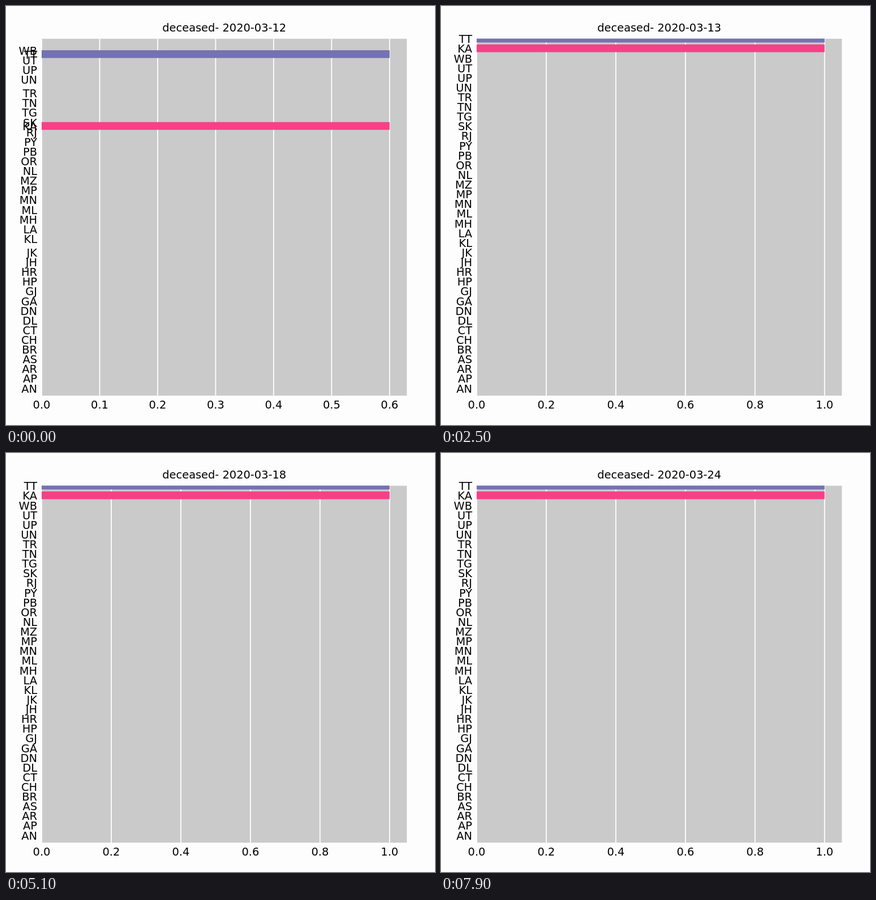
Write an HTML page with a canvas that moves like this. It is 758 by 739 pixels and loops after 8000 ms.

```html
<!DOCTYPE html>
<html lang="en">
<head>
<meta charset="utf-8">
<style>
  html, body { margin: 0; width: 100%; height: 100%; overflow: hidden; }
  canvas { display: block; }
</style>
</head>
<body>
<canvas id="stage" width="758" height="739"></canvas>
<script>
const ctx = document.getElementById('stage').getContext('2d');
const LOOP = 8000;
const LEFT = 63, RIGHT = 708.5, TOP = 57.5, BOTTOM = 687.5;
const ROW = (BOTTOM - TOP) / 36.8;
const BAR_WIDTH = (RIGHT - LEFT) / 1.05;
const CODES = ('AN AP AR AS BR CH CT DL DN GA GJ HP HR JH JK KL LA MH ML MN MP MZ ' +
  'NL OR PB PY RJ SK TG TN TR UN UP UT WB KA TT').split(' ');
const COLORS = { KA: '#f74187', TT: '#7572b2' };
// Times at which the date moves on by one day
const DAY_TIMES = [400, 2600, 3500, 3700, 4300, 4800, 5300, 5800, 6300, 6800, 7300, 7800];

const rowY = rank => BOTTOM - (rank - 0.2) * ROW;

// KA and TT climb to the top; every row they pass slides down one place.
function rankOf(index, value) {
  const rank = index + 1, left = 1 - value;
  const shift = rank === 37 ? -4 : rank === 36 ? -20 : rank >= 32 ? 2 : rank >= 16 ? 1 : 0;
  return rank + shift * left;
}

function text(str, x, y, align) {
  ctx.textAlign = align;
  ctx.fillText(str, x, y);
}

function draw(t) {
  const value = t < 100 ? 0.6 : t < 400 ? 0.8 : 1;
  const day = 12 + DAY_TIMES.filter(time => t >= time).length;
  const bright = t >= 400 && t < 2500;

  ctx.fillStyle = bright ? '#fff' : '#fdfdfd';
  ctx.fillRect(0, 0, 758, 739);

  ctx.save();
  ctx.beginPath();
  ctx.rect(LEFT, TOP, RIGHT - LEFT, BOTTOM - TOP);
  ctx.clip();
  ctx.fillStyle = bright ? '#ccc' : '#cacaca';
  ctx.fillRect(LEFT, TOP, RIGHT - LEFT, BOTTOM - TOP);

  const step = value < 1 ? 0.1 : 0.2;
  const ticks = Array.from({ length: Math.round(value / step) + 1 }, (_, i) => i * step);
  const tickX = tick => LEFT + tick / value * BAR_WIDTH;
  ctx.fillStyle = '#fff';
  for (const tick of ticks) ctx.fillRect(tickX(tick) - 0.9, TOP, 1.8, BOTTOM - TOP);

  CODES.forEach((code, i) => {
    if (!COLORS[code]) return;
    ctx.fillStyle = COLORS[code];
    ctx.fillRect(LEFT, rowY(rankOf(i, value)) - ROW * 0.4, BAR_WIDTH, ROW * 0.8);
  });
  ctx.restore();

  ctx.fillStyle = '#000';
  ctx.font = '19.4px "DejaVu Sans", sans-serif';
  text('deceased- 2020-03-' + day, (LEFT + RIGHT) / 2, 44.7, 'center');
  for (const tick of ticks) text(tick.toFixed(1), tickX(tick), 710, 'center');
  CODES.forEach((code, i) => text(code, 55, rowY(rankOf(i, value)) + 7.8, 'right'));
}

function tick(now) {
  draw(now % LOOP);
  requestAnimationFrame(tick);
}
draw(0);
requestAnimationFrame(tick);
</script>
</body>
</html>
```
